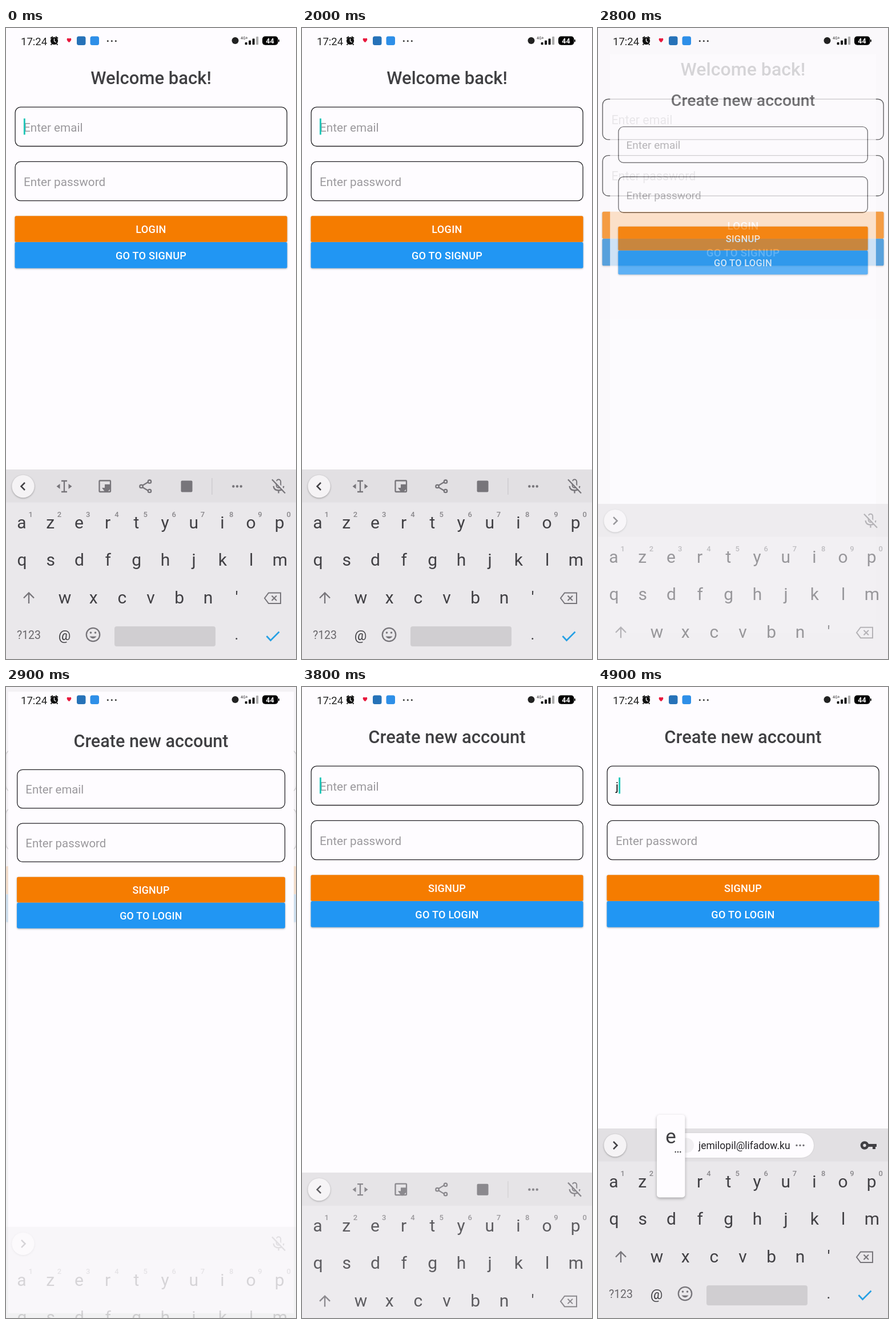
Animation of 508x1102 px, one loop 5 s. Source, as an HTML page:

```html
<!DOCTYPE html>
<html lang="en">
<head>
<meta charset="utf-8">
<title>Login and signup</title>
<style>
html, body { margin: 0; width: 100%; height: 100%; overflow: hidden; background: #f2f1f3; }
svg { display: block; width: 100%; height: 100%; font-family: Roboto, sans-serif; }
.title { font-size: 31px; font-weight: 500; fill: #404043; }
.field { fill: none; stroke: #242327; stroke-width: 1.3; }
.hint { font-size: 20.7px; fill: #9b999d; }
.btn { font-size: 18.1px; font-weight: 500; fill: #fff; letter-spacing: .25px; }
.lift { filter: drop-shadow(0 1px 1.6px rgba(0, 0, 0, .32)); }
.key { font-size: 30px; fill: #414044; }
.num { font-size: 13px; font-weight: 500; fill: #89878b; }
.mid { text-anchor: middle; }
.line { fill: none; stroke: #77757a; stroke-width: 2.3; }
.icon { fill: #77757a; }
.chip { font-size: 17.5px; fill: #232226; }
</style>
</head>
<body>
<svg id="stage" viewBox="0 0 508 1102"></svg>
<script>
const PAGE = '#fefcff';
const text = (x, y, s, cls, extra = '') => `<text x="${x}" y="${y}" class="${cls}" ${extra}>${s}</text>`;
const rect = (x, y, w, h, r, fill, extra = '') =>
  `<rect x="${x}" y="${y}" width="${w}" height="${h}" rx="${r}" fill="${fill}" ${extra}/>`;
const circle = (x, y, r, extra = '') => `<circle cx="${x}" cy="${y}" r="${r}" ${extra}/>`;
const path = (d, extra = 'class="line"') => `<path d="${d}" ${extra}/>`;
const dots = (x, y, gap, r, extra = 'class="icon"') =>
  [-gap, 0, gap].map(d => circle(x + d, y, r, extra)).join('');

const screen = (id, title, action, link) => `<g id="${id}">
  ${rect(0, 0, 508, 1102, 0, PAGE)}
  ${text(254, 98, title, 'title mid')}
  ${rect(16.1, 138.2, 476, 68.3, 9.5, 'none', 'class="field"')}
  ${rect(16.1, 233.4, 476, 68.3, 9.5, 'none', 'class="field"')}
  ${text(31, 180.5, 'Enter email', 'hint', `id="${id}Email"`)}
  ${text(31, 275.7, 'Enter password', 'hint')}
  ${rect(30.9, 158, 2.9, 28.3, 0, '#1fc6b8', `id="${id}Caret"`)}
  <g class="lift">${rect(15.5, 328.3, 477, 45.5, 2.5, '#f57c00')}${rect(15.5, 374, 477, 45.5, 2.5, '#2196f3')}</g>
  <g clip-path="url(#press)">${circle(285.5, 397, 0, `id="${id}Ripple" fill="#000" opacity=".13"`)}</g>
  ${text(254, 358.3, action, 'btn mid')}
  ${text(254, 404, link, 'btn mid')}
</g>`;

const status = `
  ${text(26, 29.5, '17:24', 'clock', 'font-size="18.5" fill="#222"')}
  ${circle(84.5, 22.5, 6.6, 'fill="#111"')}
  ${path('M78 18l4-3M91 18l-4-3M80 28l-1.500 1.500M89 28l1.500 1.500', 'stroke="#111" stroke-width="2"')}
  ${path('M84.500 18.500v4.500l3 2', 'stroke="#fff" stroke-width="1.300" fill="none"')}
  ${path('M110.500 25.200C104 20.500 107 15.800 110.500 18.600C114 15.800 117 20.500 110.500 25.200z', 'fill="#e8173c"')}
  ${rect(124, 14.5, 15.5, 15.5, 3.5, '#2672b8')}
  ${rect(147.500, 14.5, 15.5, 15.5, 3.5, '#2e8fe8')}
  ${dots(185.3, 22.7, 7, 1.5, 'fill="#333"')}
  ${circle(401.5, 22, 6, 'fill="#222"')}
  ${text(411, 19.5, '4G+', '', 'font-size="7" fill="#333"')}
  ${[0, 1, 2, 3].map(i => rect(418.6 + 6.5 * i, 25 - 3.3 * i, 4, 4.3 + 3.3 * i, 1, i < 3 ? '#111' : '#aaa')).join('')}
  ${rect(449, 14.5, 27.5, 15.3, 5, '#000')}${rect(477, 20, 1.8, 4.5, .9, '#000')}
  ${text(462.5, 26.7, '44', 'mid', 'font-size="12.500" font-weight="700" fill="#fff"')}`;

const row = (chars, x, y) => [...chars].map((c, i) => text(x + 50.2 * i, y, c, 'key mid')).join('');

const keys = `
  ${row('azertyuiop', 27.5, 874)}
  ${[...'1234567890'].map((c, i) => text(43.3 + 50.2 * i, 853.5, c, 'num mid')).join('')}
  ${row('qsdfghjklm', 28, 939)}
  ${row("wxcvbn'", 103, 1004.5)}
  ${path('M40 1005V987M31 995.500l9-9l9 9')}
  ${path('M460 986.500h21v18.500h-21l-7-9.250zM465.500 991.500l8.500 8.500M474 991.500l-8.500 8.500', 'class="line" style="stroke-width:2"')}
  ${text(40, 1067, '?123', 'mid', 'font-size="19.500" fill="#69676b"')}
  ${text(102.5, 1069, '@', 'mid', 'font-size="24" fill="#414044"')}
  ${circle(152.5, 1059.5, 11.7, 'class="line"')}
  ${circle(148.5, 1056, 1.8, 'class="icon"')}${circle(156.5, 1056, 1.8, 'class="icon"')}
  ${path('M146.500 1062.500q6 7.500 12 0z', 'class="icon"')}
  ${rect(190, 1045, 177, 35, 4, '#d0ced1')}
  ${text(404, 1068, '.', 'mid', 'font-size="26" fill="#414044"')}
  ${path('M456.500 1062l7 7.500l15-15', 'fill="none" stroke="#26a0e4" stroke-width="2.700"')}`;

const tools = `<g id="tools">
  ${path('M97 791h10M102 791v19M97 810h10')}
  ${path('M88.500 800.500l6-4.500v9zM115.500 800.500l-6-4.500v9z', 'class="icon"')}
  ${rect(163.500, 790.5, 19.5, 19.5, 1, 'none', 'class="line"')}
  ${path('M173 797h10.500v7l-6.500 7h-3l-6-8h5z', 'class="icon"')}
  ${path('M249 793l-10 6M249 808l-10-6')}
  ${circle(237, 800.5, 2.7, 'class="line"')}${circle(251.5, 792.2, 2.7, 'class="line"')}${circle(251.5, 808.5, 2.7, 'class="line"')}
  ${rect(306.5, 790.5, 20, 20, 2, '#77757a')}
  ${rect(360.3, 786, 1.2, 29, 0, '#c9c7ca')}
  ${dots(405, 800.5, 6.7, 2.2)}
</g>`;

const mic = `<g id="mic">
  ${rect(473.7, 788.5, 7.500, 14.5, 3.7, 'none', 'class="line" style="stroke-width:2"')}
  ${path('M468.500 800q1 7.500 9 7.500t9-7.500M477.500 807.500v5')}
  ${path('M467.500 786.500l23 24', 'stroke="#e3e1e4" stroke-width="3"')}
  ${path('M466 788.500l23 24')}
</g>`;

const chip = (id, x, w, label, more) => `<g id="${id}">
  ${rect(x, 779, w, 43, 21.5, PAGE, 'class="lift" style="filter:drop-shadow(0 0 1px rgba(0,0,0,.12))"')}
  ${circle(x + 26, 800.5, 13, 'fill="#f1eff2"')}
  ${text(x + 47, 806.7, label, 'chip')}${more}
</g>`;

const chips = `<g id="chips">
  <g id="strip">
    ${chip('chipA', 73, 249, 'jemilopil@lifadow.ku', dots(298, 800.5, 6, 1.7))}
    ${chip('chipB', 335, 254, 'conahlu', '')}
  </g>
  ${rect(441.3, 774, 1.2, 52, 0, '#bfbdc0', 'id="divider"')}
  ${circle(467, 800.5, 5, 'fill="none" stroke="#414044" stroke-width="4.600"')}
  ${path('M473 798h15v5h-2v4h-5v-4h-8z', 'fill="#414044"')}
</g>`;

const popup = `<g id="popup">
  ${rect(103, 747, 49.5, 144.5, 5, PAGE, 'style="filter:drop-shadow(0 2px 2.500px rgba(0,0,0,.3))"')}
  ${text(127.5, 796.5, 'e', 'mid', 'id="popKey" font-size="35" fill="#414044"')}
  ${dots(140, 812, 4.3, 1.2, 'class="popDot" fill="#414044"')}
</g>`;

const stage = document.getElementById('stage');
stage.innerHTML = `<defs>
    <clipPath id="press">${rect(15.5, 374, 477, 45.5, 2.5, '#000')}</clipPath>
    <clipPath id="stripBox">${rect(50, 771, 391.3, 58, 0, '#000')}</clipPath>
  </defs>
  ${rect(0, 0, 508, 1102, 0, '#f2f1f3')}
  ${screen('login', 'Welcome back!', 'LOGIN', 'GO TO SIGNUP')}
  ${screen('signup', 'Create new account', 'SIGNUP', 'GO TO LOGIN')}
  <g id="board">
    ${rect(0, 771, 508, 331, 0, '#eae8eb')}${rect(0, 771, 508, 57.5, 0, '#e2e0e3')}
    ${keys}${tools}${mic}${chips}
    ${circle(30, 800.5, 19.7, `fill="#f5f3f5" class="lift"`)}
    ${path('', 'id="chevron" fill="none" stroke="#414044" stroke-width="2.500"')}
    ${popup}
  </g>
  ${status}`;

const $ = id => document.getElementById(id);
const set = (id, attrs) => { for (const k in attrs) $(id).setAttribute(k, attrs[k]); };
const show = (id, on) => set(id, { visibility: on ? 'inherit' : 'hidden' });
const clamp = v => Math.min(1, Math.max(0, v));
const zoom = (s, x, y) => `translate(${x} ${y}) scale(${s}) translate(${-x} ${-y})`;
const easeOut = (u, p) => 1 - (1 - u) ** p;

function draw(t) {
  // page change
  const u = clamp((t - 2750) / 280), e = easeOut(u, 3);
  set('login', { transform: zoom(1 + .076 * e, 254, 551), opacity: clamp(1 - 1.55 * u) });
  set('signup', { transform: zoom(.85 + .15 * e, 254, 551), opacity: clamp(4 * u) });
  set('loginRipple', { r: t < 2600 ? 0 : 196.5 + 2 * (t - 2600) });

  // carets and typed letter
  const typed = t >= 4900;
  show('loginCaret', t < 2600 && t % 1000 < 600);
  show('signupCaret', t >= 3600 && t < 4100 || t >= 4600);
  set('signupCaret', { x: typed ? 36.2 : 30.9 });
  $('signupEmail').textContent = typed ? 'j' : 'Enter email';
  $('signupEmail').style.fill = typed ? '#111' : '';

  // keyboard leaves, then returns
  const out = clamp((t - 2655) / 340), back = clamp((t - 3700) / 260);
  const away = t < 3700 ? out * out : 1 - easeOut(back, 3);
  set('board', {
    transform: `translate(0 ${331 * away})`,
    opacity: t < 3700 ? clamp(1 - 1.1 * out) : clamp(2.2 * back)
  });

  // toolbar or suggestion strip
  const full = t < 2600 || t >= 3800 && t < 4100;
  const suggest = t >= 2600 && t < 2800 || t >= 4100;
  show('tools', full);
  show('mic', !suggest);
  show('chips', suggest);
  set('chevron', { d: full ? 'M33 794l-6.500 6.500l6.500 6.500' : 'M27 794l6.500 6.500l-6.500 6.500' });
  const start = t < 4000 ? 2478 : 4078;
  const grow = delay => easeOut(clamp((t - start - delay) / 221), 2);
  set('chipA', { transform: typed ? 'translate(56 0)' : zoom(grow(0), 197.5, 800.5) });
  set('chipB', { transform: zoom(grow(74), 462, 800.5) });
  set('strip', { 'clip-path': 'url(#stripBox)' });
  show('chipB', suggest && !typed);
  show('divider', suggest && !typed);

  // key preview
  show('popup', t >= 4800);
  set('popup', { transform: typed ? '' : 'translate(203.500 65)' });
  $('popKey').textContent = typed ? 'e' : 'j';
  for (const d of document.querySelectorAll('.popDot')) d.setAttribute('opacity', typed ? 1 : 0);
}

const begin = performance.now();
function frame() {
  const t = (performance.now() - begin) % 5000;
  draw(Math.floor(t / 100) * 100); // ten pictures a second
  requestAnimationFrame(frame);
}
frame();
</script>
</body>
</html>
```
